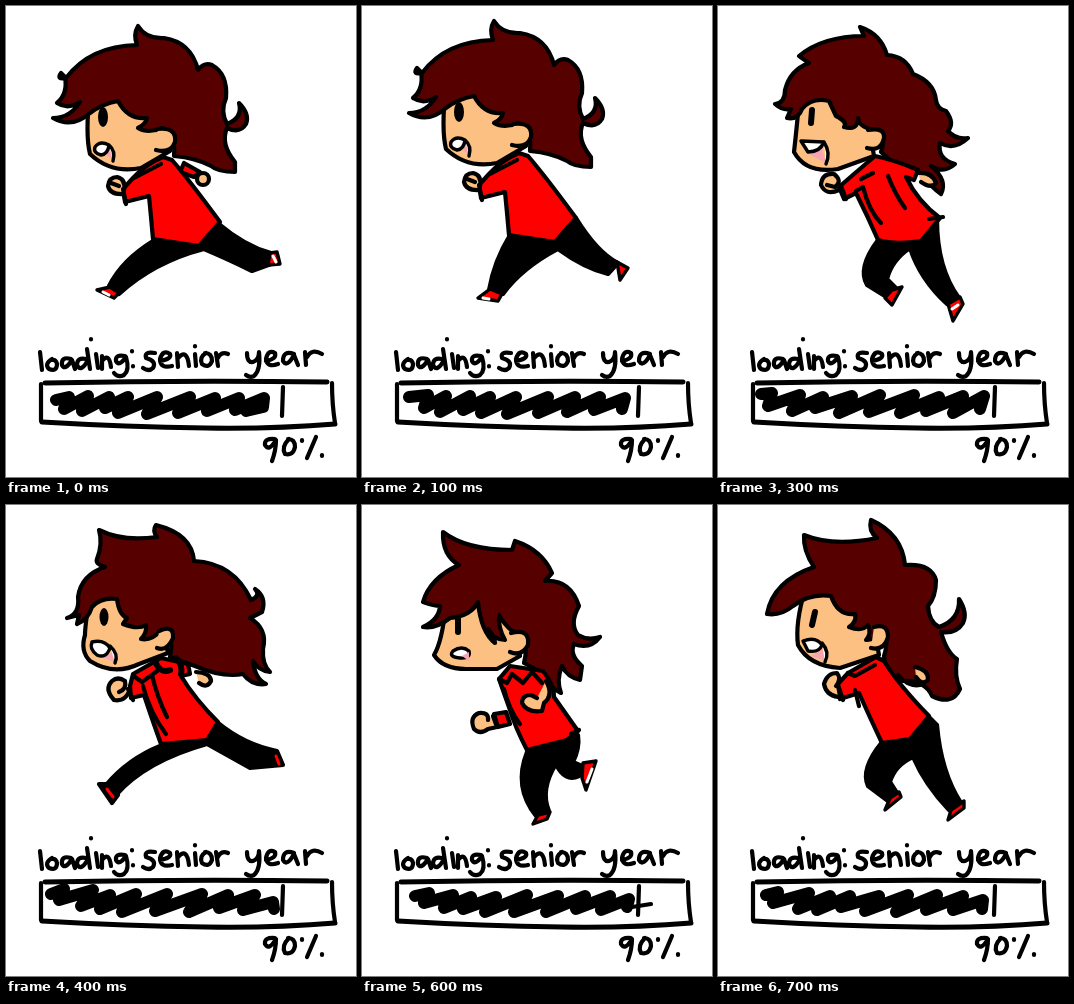
Animation, 350 px wide and 471 px high, one loop 0.8 s. Source, as an HTML page without scripts:

```html
<!DOCTYPE html>
<html lang="en">
<head>
<meta charset="utf-8">
<title>loading: senior year</title>
<style>
html, body { margin: 0; width: 100%; height: 100%; overflow: hidden; background: #fff; }
svg { display: block; width: 100%; height: 100%; }
path, circle, ellipse { stroke: #000; stroke-width: 4.2; stroke-linecap: round; stroke-linejoin: round; fill: none; }
.hair { fill: #560000; }
.skin { fill: #fdc083; }
.red { fill: #f00; }
.black { fill: #000; }
.eye { fill: #000; stroke: none; }
.white { fill: #fff; stroke-width: 3.4; }
.pink { fill: #f6a5b2; stroke: none; }
.shoe { fill: #f00; stroke-width: 3.4; }
.tip { stroke: #fff; stroke-width: 3; }
.sole { stroke: #f00; stroke-width: 3; }
.thick { stroke-width: 6; }
.fill { stroke-width: 12; }
.ink .bar { stroke-width: 5; }
.pose { opacity: 0; animation: show .8s step-end infinite; animation-delay: calc(var(--i) * .1s - .8s); }
@keyframes show { 0% { opacity: 1 } 12.5%, 100% { opacity: 0 } }
</style>
</head>
<body>
<svg viewBox="0 0 350 471" role="img" aria-label="loading: senior year, 90%">

<!-- lettering and bar -->
<g class="ink">
  <path d="M34 346L36 364M46 353Q38 358 43 363Q51 366 51 358Q50 353 45 354M65 353Q55 350 56 359Q59 365 66 354L69 363M80 353Q71 351 71 359Q75 367 82 354M81 343L84 363M90 348L92 362M85 333v.5M96 363L96 350M96 355Q103 346 105 361M119 350Q109 348 110 355Q113 361 120 351Q124 364 118 369Q112 372 108 367M126 345v.5M127 360v.5"/>
  <path d="M149 347Q138 345 140 352Q151 355 147 362Q143 366 137 362M154 355Q166 353 164 348Q157 343 154 353Q154 363 166 360M172 361L171 347M172 352Q181 342 183 360M189 348L190 360M189 340v.5M200 347Q193 351 196 358Q203 363 206 355Q206 347 199 347M212 360L210 347M212 352Q215 345 222 348"/>
  <path d="M241 347Q241 357 247 356Q253 354 253 346Q255 364 248 370Q244 372 240 369M260 355Q271 353 269 347Q262 343 260 353Q261 362 272 358M288 348Q277 344 277 355Q281 362 288 349L292 359M300 359L299 346M301 351Q306 342 316 348"/>
  <path d="M269 433Q258 432 259 439Q263 446 270 434Q270 444 266 455M283 433Q275 441 279 448Q287 450 289 441Q289 433 282 433M296 434v1M310 431L301 452M316 449v1"/>
  <path class="bar" d="M39 377Q180 374 321 376M36 416Q120 421 200 422Q270 423 329 418"/>
  <path d="M35 378L35 415M326 377Q326 398 329 417M277 381L276 410"/>
</g>

<g class="pose" style="--i:0">
  <g id="headA">
    <path class="skin" d="M84 85Q79 128 84 148Q105 168 135 162L164 145L150 90Z"/>
    <path class="hair" d="M55 67Q50 74 60 72Q84 40 131 39Q127 28 132 20Q140 33 158 32Q185 36 192 64Q198 56 206 59Q222 68 220 92Q214 105 221 118Q237 112 233 97Q244 108 240 118Q234 128 221 122Q214 138 229 156L229 166Q212 166 205 160Q190 152 168 150Q170 125 156 122Q142 128 132 122Q140 118 141 112Q122 114 112 95Q96 98 84 107Q66 123 47 112Q64 112 74 96Q62 104 51 97Q62 88 59 71Z"/>
    <path class="skin" d="M152 123Q171 121 169 136Q165 148 150 144"/>
    <ellipse class="eye" cx="97" cy="111" rx="5" ry="10"/>
    <path class="pink" d="M99 148L108 143L108 154Z"/>
    <path class="white" d="M89 141Q94 134 103 139Q102 148 95 149Q87 147 89 141ZM103 139Q110 145 107 155"/>
  </g>
  <path class="red" d="M178 157L194 166L188 171L174 166Z"/>
  <circle class="skin" cx="197" cy="173" r="6"/>
  <path class="black" d="M147 235Q116 254 103 280L113 288Q148 256 198 243Q224 254 246 265L268 257L265 247Q239 240 213 218Z"/>
  <path class="shoe" d="M91 284L104 281L113 287L108 292ZM264 247L271 246L274 258L262 259Z"/>
  <path class="tip" d="M97 286L103 289M267 250L270 256"/>
  <g id="torsoA">
    <path class="red" d="M127 172Q140 158 157 151L166 154Q184 175 214 216L193 240L147 233Q145 210 143 190L119 196L117 183Z"/>
    <path class="skin" d="M118 188Q104 189 102 180Q103 171 111 171Q120 173 118 184M105 177L113 180"/>
    <path d="M117 183L120 198M128 172L155 158"/>
  </g>
  <path class="fill" d="M50 394L63 391L58 403L82 390L76 405L103 391L99 402L122 391L112 407L151 391L141 408L184 391L172 407L209 392L201 405L233 392L229 404L258 392L257 401L240 405"/>
</g>

<g class="pose" style="--i:1">
  <use href="#headA" y="-5"/>
  <path class="black" d="M148 229Q132 255 127 284L141 288Q160 262 196 243Q222 262 246 268L256 257Q235 246 214 212Z"/>
  <path class="shoe" d="M116 292L128 283L140 288L136 295ZM255 256L266 262L258 274Z"/>
  <path class="tip" d="M121 292L127 293"/>
  <use href="#torsoA" y="-4"/>
  <path class="fill" d="M47 391L66 389L62 402L84 390L78 406L108 390L101 404L128 391L119 407L154 391L145 408L186 391L176 407L213 391L205 406L238 391L232 404L263 392L260 403"/>
</g>

<g class="pose" style="--i:2">
  <path class="skin" d="M82 98Q78 140 83 153Q105 171 138 164L160 150L150 95Z"/>
  <path class="hair" d="M57 109Q69 106 65 95Q77 66 104 58Q97 55 98 49Q101 32 108 21Q120 28 138 36L139 27Q179 30 183 64Q206 66 212 82Q215 100 214 124Q238 132 240 148Q233 163 238 177Q235 190 226 195L221 188Q218 198 208 201Q200 181 187 174L163 158Q169 132 156 126Q156 116 149 108Q150 128 130 130Q138 124 136 117Q126 117 118 99Q104 101 88 109Q85 131 65 134Q73 127 73 118Q65 118 57 109Z"/>
  <path class="skin" d="M150 128Q166 125 165 138Q161 150 149 145"/>
  <ellipse class="eye" cx="97" cy="119" rx="4.5" ry="10"/>
  <path class="pink" d="M92 153L104 148L108 162Z"/>
  <path class="white" d="M87 147L104 146Q103 155 94 153ZM104 146Q110 154 108 163"/>
  <path class="black" d="M167 244Q156 276 176 305L187 302Q180 284 193 262Q201 282 219 271L221 261L206 256Q217 236 208 218Z"/>
  <path class="shoe" d="M171 317L178 307L189 305L184 311ZM220 259L234 255L227 282L219 272Z"/>
  <path class="tip" d="M231 261L227 274"/>
  <path class="red" d="M138 169Q148 163 160 158Q180 166 189 190L208 217Q204 236 168 245Q158 226 152 209L138 203Q135 185 138 169ZM136 163L158 151L161 157L139 168Z"/>
  <path class="skin" d="M125 211L152 206L152 214L126 221Q121 229 111 225Q105 215 113 209Q121 207 125 215"/>
  <path d="M153 181Q149 195 153 210M178 174Q186 180 189 190"/>
  <path class="fill" d="M46 388L64 388L60 398L85 390L77 405L108 391L98 406L132 391L119 405L158 390L149 407L185 391L178 405L213 390L204 405L239 391L231 406L264 391L265 403"/>
</g>

<g class="pose" style="--i:3">
  <path class="skin" d="M82 85Q79 120 76 146Q88 168 120 163L156 150L145 85Z"/>
  <path class="hair" d="M57 98Q67 97 67 84Q72 64 91 57L81 50Q105 30 146 30L142 21Q163 28 169 49Q188 50 195 68Q216 76 218 94Q219 103 228 105Q237 117 230 125Q238 134 250 132Q236 145 222 137Q219 153 237 158Q226 168 213 160Q230 174 223 188Q213 181 208 172Q195 160 174 156L163 146Q171 123 151 123Q140 119 140 112Q140 125 126 121Q130 116 118 110L111 95Q94 91 84 103Q80 114 69 112L73 103Q65 105 57 98Z"/>
  <path class="skin" d="M150 124Q167 121 166 132Q163 146 149 142"/>
  <path class="thick" d="M94 104L93 117"/>
  <path class="pink" d="M87 146L104 143L108 157Z"/>
  <path class="white" d="M83 135L106 136Q102 146 90 146ZM106 136Q113 147 108 158"/>
  <path class="skin" d="M200 167Q214 166 218 177Q213 183 203 176"/>
  <path class="black" d="M160 234Q139 262 149 279L170 292L178 282L169 273Q174 254 192 242Q202 273 229 298L241 292Q219 262 219 213Z"/>
  <path class="shoe" d="M174 284L184 281L174 299L167 292ZM230 298L242 291L245 298L235 315Z"/>
  <path class="tip" d="M234 303L240 299"/>
  <path class="red" d="M136 168L157 150Q177 154 200 164L196 174L188 171Q200 196 222 212L203 235Q177 239 160 234Q150 211 138 187L126 193L121 181Z"/>
  <path class="skin" d="M121 184Q108 190 103 179Q104 167 116 168Q125 175 117 181L109 179"/>
  <path d="M123 180L128 193M138 185L145 181Q151 205 163 217M143 173L155 167M170 170Q177 188 187 202M211 213L225 211"/>
  <path class="fill" d="M43 388L54 387L50 400L82 389L74 405L105 391L97 402L134 390L121 407L162 389L151 406L196 389L182 407L221 391L208 405L245 390L235 407L266 390L262 403"/>
</g>

<g class="pose" style="--i:4">
  <g id="headB">
    <path class="skin" d="M85 85Q79 119 79 130Q74 146 84 156Q108 171 133 159L162 148L150 90Z"/>
    <path class="hair" d="M61 113Q74 109 72 92Q75 70 99 62Q89 59 91 54Q97 39 93 25Q117 37 151 32Q146 26 150 20Q186 29 188 56Q228 58 245 95Q255 91 249 84Q261 92 256 107L244 113Q262 124 257 144Q256 159 264 167Q253 166 247 156Q249 174 260 179Q246 181 237 169Q217 173 189 161L164 152Q169 128 155 125Q146 136 135 134Q141 128 140 120Q132 125 117 119L121 113Q113 110 111 94Q95 92 86 102Q82 115 71 119L73 110Z"/>
    <path class="skin" d="M153 126Q168 119 167 133Q161 147 151 143"/>
    <ellipse class="eye" cx="98" cy="112" rx="4.5" ry="9"/>
    <path class="pink" d="M97 153L108 146L109 157Z"/>
    <path class="white" d="M86 137Q98 134 104 143Q100 154 91 150Q83 144 86 137ZM104 141Q113 149 109 158"/>
  </g>
  <path class="skin" d="M190 167Q205 168 205 176Q201 184 193 178"/>
  <path class="black" d="M154 241Q122 254 100 280L110 290Q140 256 201 239L244 263L277 260L271 246Q239 240 212 218Z"/>
  <path class="black" d="M93 279L106 298L112 290L103 279Z"/>
  <path class="sole" d="M101 284L107 292M270 251L273 259"/>
  <g id="torsoB">
    <path class="red" d="M127 169L155 153L182 159L184 169L175 171Q189 194 212 217L201 235L155 239Q147 217 138 190L125 193L124 181Z"/>
    <path class="skin" d="M124 184Q120 197 108 195Q98 184 106 176Q112 171 119 176Q121 184 113 187"/>
    <path d="M122 184L127 195M129 172L136 177L154 164M137 181Q144 208 160 229M146 170Q151 192 161 212"/>
  </g>
  <path class="thick" d="M149 156Q154 169 164 165M170 153Q177 160 175 169"/>
  <path class="fill" d="M45 389L58 384L53 395L87 385L75 401L104 390L94 404L130 389L116 407L161 389L149 406L196 389L183 407L222 390L213 403L249 390L237 405L267 397L268 404"/>
</g>

<g class="pose" style="--i:5">
  <use href="#headB" y="-5"/>
  <path class="black" d="M154 236Q135 258 129 287L143 291Q160 264 198 241Q221 264 246 269L255 258Q231 248 211 212Z"/>
  <path class="shoe" d="M118 295L129 286L143 291L138 297ZM252 258L264 265L255 276Z"/>
  <use href="#torsoB" y="-4"/>
  <path class="fill" d="M48 389L60 386L57 396L88 387L78 402L108 390L98 405L133 390L121 407L162 390L151 406L196 390L184 407L222 391L213 404L248 391L238 405L267 397"/>
</g>

<g class="pose" style="--i:6">
  <path class="skin" d="M84 100Q80 137 72 150Q81 164 104 164L135 164L158 151L148 90Z"/>
  <path class="hair" d="M61 97Q68 73 97 60Q80 50 81 27Q104 45 150 45L153 36Q180 45 190 68L183 76Q208 74 217 101Q207 119 216 130Q226 136 238 132Q228 145 212 139Q207 150 220 161L218 175Q205 172 200 161Q194 175 199 188Q185 181 181 168L162 158Q169 129 150 126Q142 119 137 110Q136 123 143 135Q130 134 126 124Q133 132 133 138Q119 127 116 97Q109 111 88 113Q74 124 61 122Q77 115 78 101Q72 101 61 97Z"/>
  <path class="skin" d="M149 128Q168 123 166 140Q160 152 148 147"/>
  <path class="thick" d="M96 113L96 127"/>
  <path class="white" d="M91 146Q100 140 107 146Q109 154 98 153Q86 152 91 146Z"/>
  <path class="pink" d="M100 151L107 147L107 156Z"/>
  <path class="black" d="M165 247Q151 282 174 311L187 306Q178 285 194 259Q203 278 217 271L222 262L211 257Q218 243 216 230Z"/>
  <path class="shoe" d="M171 319L176 310L188 307L185 314ZM221 258L234 256L224 285L220 273Z"/>
  <path class="tip" d="M230 264L225 277"/>
  <path class="red" d="M137 174L148 161L181 166Q193 181 192 192L216 226L205 235L165 245Q153 222 148 205ZM132 209L144 207L148 219L136 222Z"/>
  <path class="skin" d="M131 211L135 222L126 224Q118 230 112 224Q107 212 117 208Q127 207 126 215M184 176Q192 190 182 198L180 206Q165 208 160 198Q160 190 169 190L175 193"/>
  <path d="M137 174L145 178L150 169L161 178L170 167L180 178M142 184Q147 205 158 219M209 229L217 225M270 402L289 399"/>
  <path class="fill" d="M53 391L67 388L62 398L91 390L82 403L109 392L101 404L134 392L123 407L165 390L152 407L196 391L184 407L223 391L214 404L248 391L239 405L267 394L265 402"/>
</g>

<g class="pose" style="--i:7">
  <path class="skin" d="M87 85Q77 118 80 140Q91 161 122 163L161 150L150 90Z"/>
  <path class="hair" d="M49 109Q55 76 96 62Q85 46 86 30Q115 42 159 33Q150 26 153 15Q184 29 187 60Q213 58 218 75Q218 92 210 101Q211 117 221 122Q242 115 241 94Q250 108 245 118Q238 129 223 127Q229 148 239 154Q236 171 242 184Q234 201 214 191Q207 175 185 176Q168 170 166 151Q173 130 159 122Q160 135 148 135Q154 128 150 120Q144 127 131 122Q139 117 137 109Q120 111 113 91Q92 88 75 101Q63 111 49 109Z"/>
  <path class="skin" d="M156 122Q170 118 170 132Q166 146 153 143"/>
  <path class="thick" d="M97 107L94 120"/>
  <path class="pink" d="M93 151L105 144L107 156Z"/>
  <path class="white" d="M85 136Q98 131 104 140Q101 148 90 146ZM104 138Q112 147 107 157"/>
  <path class="skin" d="M197 162Q211 165 210 175Q204 181 198 172"/>
  <path class="black" d="M164 237Q142 264 150 281L170 296L179 288L172 277Q177 260 195 252Q207 280 231 305L243 298Q223 267 219 220L210 211Z"/>
  <path class="shoe" d="M167 305L172 293L181 287L183 292ZM230 315L233 305L246 296L246 303Z"/>
  <path class="red" d="M130 168L158 152L166 156Q180 179 211 211L192 234L164 238Q153 215 141 188L122 194L119 180Z"/>
  <path class="skin" d="M120 192Q108 190 106 179Q109 168 119 168Q124 174 118 181"/>
  <path d="M120 180L125 195M130 168L137 171L157 160M137 185L141 201M180 170Q190 182 202 180"/>
  <path class="fill" d="M48 390L60 387L55 398L91 388L80 404L112 391L99 405L132 391L123 402L161 391L147 406L190 390L178 407L219 390L208 405L245 391L235 405L265 395L264 404"/>
</g>

</svg>
</body>
</html>
```
